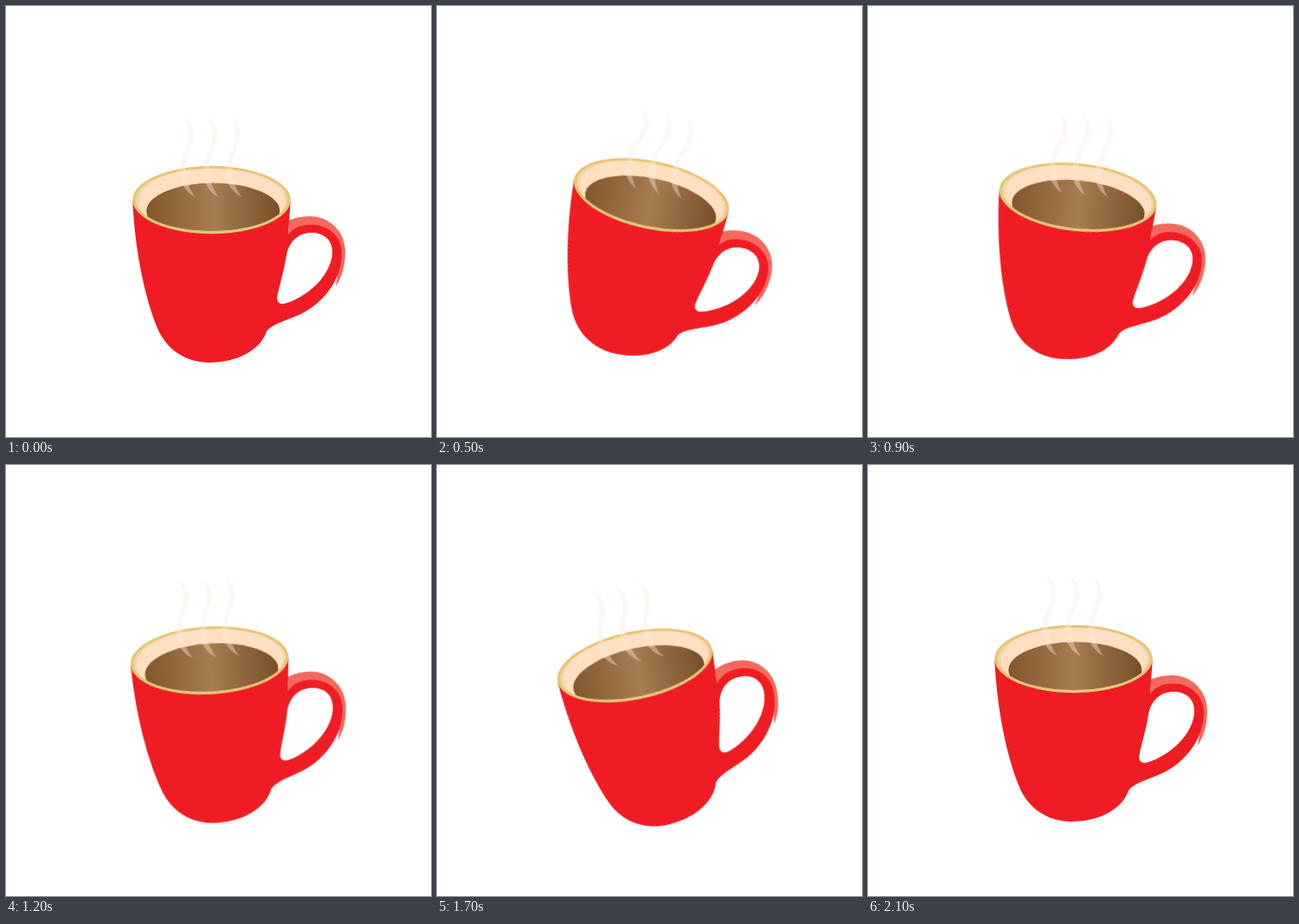
An HTML page for the animation above (2.4 s loop, 491 by 498 pixels).

```html
<!DOCTYPE html>
<html lang="en">
<head>
<meta charset="utf-8">
<title>Rocking coffee cup</title>
<style>
  html, body { margin: 0; width: 100%; height: 100%; overflow: hidden; background: #fff; }
  svg { display: block; width: 491px; height: 498px; }

  /* Rocks 15 degrees each way, 3 degrees every 100 ms */
  .cup {
    transform-origin: 269px 270px;
    animation: rock 2400ms -3ms infinite;
  }
  @keyframes rock {
    0%       { transform: rotate(0deg);   animation-timing-function: steps(1); }
    4.16667% { transform: rotate(0deg);   animation-timing-function: steps(5); }
    25%      { transform: rotate(15deg);  animation-timing-function: steps(10); }
    66.6667% { transform: rotate(-15deg); animation-timing-function: steps(5); }
    87.5%, 100% { transform: rotate(0deg); }
  }
</style>
</head>
<body>
<svg viewBox="0 0 491 498">
  <defs>
    <linearGradient id="coffee">
      <stop offset="0" stop-color="#82572e"/>
      <stop offset=".5" stop-color="#a67c52"/>
      <stop offset="1" stop-color="#784f28"/>
    </linearGradient>
    <clipPath id="opening"><ellipse cx="237.5" cy="224" rx="87.8" ry="36"/></clipPath>
    <path id="wisp" d="M0 0C9 5 14 14 12 25C10 36 3 44 3 58C3 72 6 83 14 93
      C3 87 -4 78 -4 63C-4 46 5 36 6 24C7 14 5 6 0 0Z"/>
  </defs>

  <g class="cup">
    <!-- handle edge, then body with handle -->
    <path fill="#f4695f" d="M327 248C335 244 343 243 351 243C375 243 392 262 392 284
      C392 300 388 313 381 324C386 300 390 257 352 257C340 257 332 260 326 266Z"/>
    <path fill="#ef1d23" fill-rule="evenodd" d="M146.3 226C149 280 159 332 174 370
      C184 396 207 412 235 412C266 412 294 398 301 376C306 369 318 365 331 360
      C364 348 388 318 388 286C388 266 372 252.500 352 252.500
      C341 252.500 333 256 326 264L328.700 226Z
      M353 262C338 262 327 272 324 288C321 307 316 322 313.500 335
      C312 343 317 346 325 343C354 333 377 307 377 284C377 270 367 262 353 262Z"/>

    <!-- rim and inside -->
    <ellipse cx="237.5" cy="224" rx="91.3" ry="39.2" fill="#e5c677"/>
    <g clip-path="url(#opening)">
      <rect x="146" y="184" width="184" height="80" fill="#f3d7a8"/>
      <ellipse cx="238" cy="225" rx="84.5" ry="38" fill="#ffdfc1"/>
      <ellipse cx="239.3" cy="237" rx="77" ry="32.5" fill="url(#coffee)"/>
    </g>

    <g fill="#fdebdc" opacity=".4">
      <use href="#wisp" x="205" y="128"/>
      <use href="#wisp" x="232" y="128"/>
      <use href="#wisp" x="258.500" y="128"/>
    </g>
  </g>
</svg>
</body>
</html>
```
